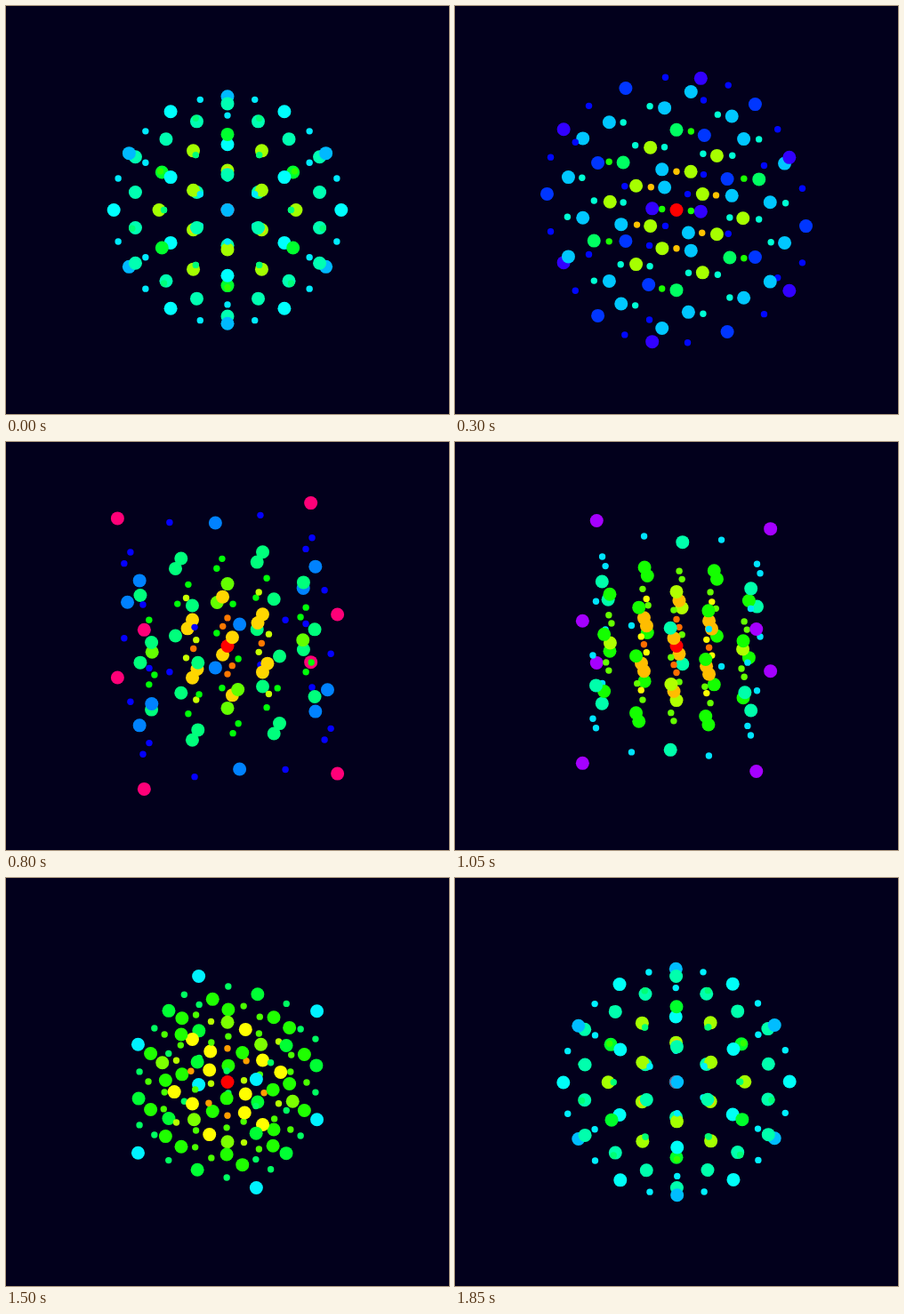
An HTML page with a canvas that plays this animation: 498 by 459 pixels, repeating every 1900 ms.

```html
<!DOCTYPE html>
<html>
<head>
<meta charset="utf-8">
<style>
  html, body { margin: 0; overflow: hidden; background: #02001c; }
  canvas { display: block; }
</style>
</head>
<body>
<canvas id="stage" width="498" height="459"></canvas>
<script>
const ctx = document.getElementById('stage').getContext('2d');
const LOOP = 1900, STEP = 50;
const TILT_COS = Math.sqrt(2 / 3), TILT_SIN = Math.sqrt(1 / 3);
const rad = deg => deg * Math.PI / 180;

// 5 x 5 x 5 cubic lattice; alternate sites are large and small
const sites = [];
for (let x = -2; x <= 2; x++)
  for (let y = -2; y <= 2; y++)
    for (let z = -2; z <= 2; z++)
      sites.push({ x, y, z, d2: x * x + y * y + z * z, size: (x + y + z) % 2 ? 3.7 : 7.5 });

function project(p, u) {
  const turn = rad(45 + 90 * u), c = Math.cos(turn), s = Math.sin(turn);
  // the swelling travels outwards from the centre
  const scale = 45 * Math.exp(0.205 * Math.cos(rad(360 * u - 11.1 * p.d2)));
  const side = p.x * c - p.z * s, front = p.x * s + p.z * c;
  return {
    x: 249 + scale * side,
    y: 229.5 - scale * (p.y * TILT_COS - front * TILT_SIN),
    depth: scale * (p.y * TILT_SIN + front * TILT_COS),
    hue: 0.0975 * (scale * Math.sqrt(p.d2)) ** 1.55,
    size: p.size
  };
}

function draw(t) {
  // short rest at the start of each loop
  const u = Math.min(1, Math.max(0, (t - 57) / 1800));
  ctx.fillStyle = '#02001c';
  ctx.fillRect(0, 0, 498, 459);
  const dots = sites.map(p => project(p, u)).sort((a, b) => a.depth - b.depth);
  for (const p of dots) {
    ctx.fillStyle = `hsl(${p.hue}, 100%, 50%)`;
    ctx.beginPath();
    ctx.arc(p.x, p.y, p.size, 0, 2 * Math.PI);
    ctx.fill();
  }
}

const start = performance.now();
function tick() {
  const t = (performance.now() - start) % LOOP;
  draw(Math.floor(t / STEP) * STEP);
  requestAnimationFrame(tick);
}
tick();
</script>
</body>
</html>
```
